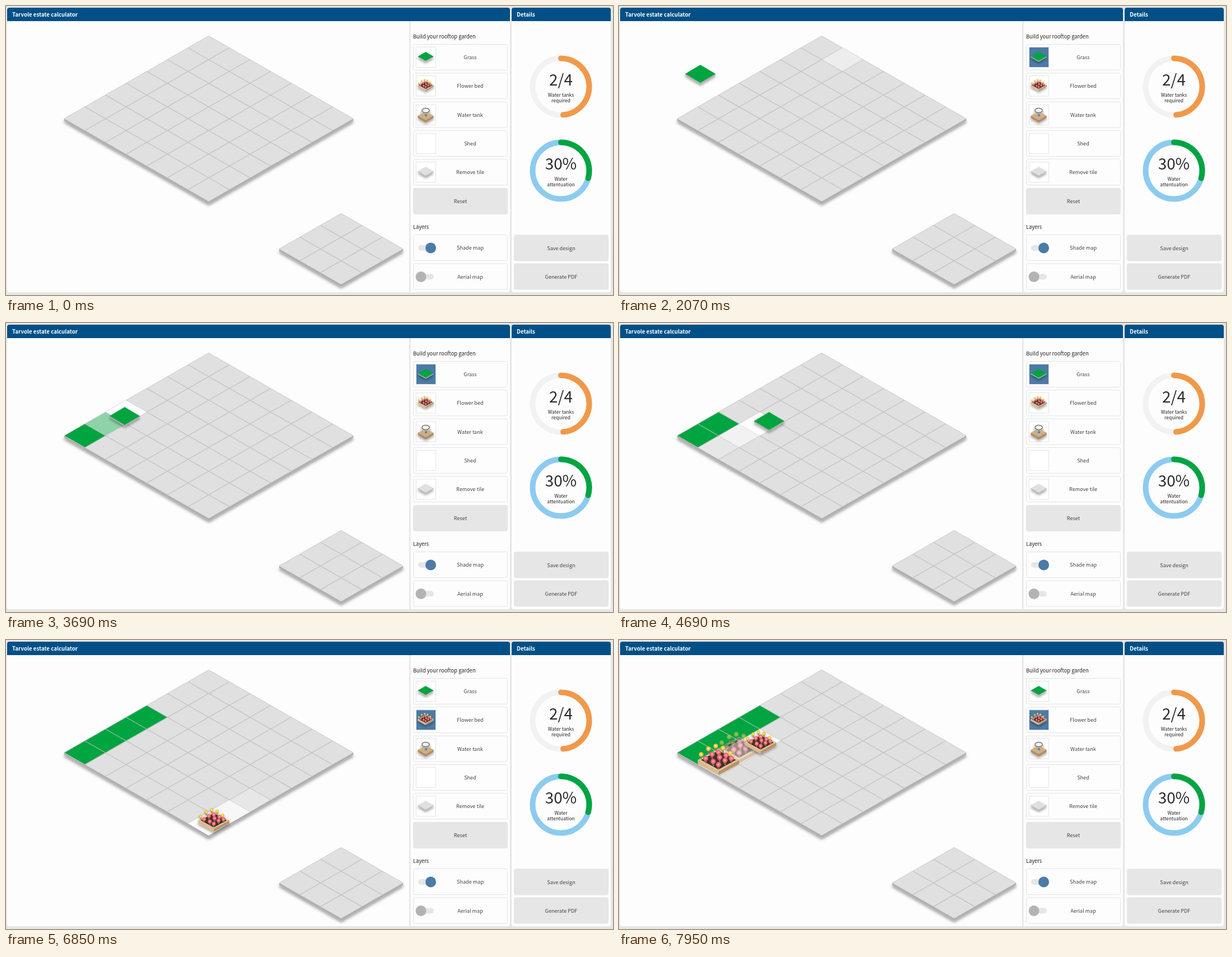
Animation, 1084 px wide and 516 px high, one loop 8 s. Source, as an HTML page:

```html
<!DOCTYPE html>
<html lang="en">
<head>
<meta charset="utf-8">
<style>
html, body { margin: 0; width: 100%; height: 100%; overflow: hidden; background: #e6e6e6; }
svg { display: block; width: 100vw; height: 100vh; }
text { font: 9.15px "Noto Sans CJK JP", "Noto Sans CJK SC", "Noto Sans CJK", "Open Sans", sans-serif; fill: #444; }
.head { font-size: 9.7px; font-weight: 700; fill: #fff; }
.title { font-size: 9.3px; font-weight: 500; fill: #222; }
.mid { text-anchor: middle; }
.big { font-size: 27.8px; fill: #2b2b2b; }
.small { font-size: 8.5px; font-weight: 500; fill: #222; }
</style>
</head>
<body>
<svg id="stage" viewBox="0 0 1084 516"></svg>
<script>
const LOOP = 8000, STEP = 77.1, PHASE = 60;
const HW = 36.86, HH = 21.1, TOP_X = 362, TOP_Y = 53.5, SIZE = 7;
const GREEN = '#00a441', BLUE = '#4b7ba6', GREY = '#e0e0e0';

const poly = (points, fill, extra = '') => `<polygon points="${points.join(' ')}" fill="${fill}" ${extra}/>`;
const rect = (x, y, w, h, fill, extra = '') => `<rect x="${x}" y="${y}" width="${w}" height="${h}" fill="${fill}" ${extra}/>`;
const circle = (x, y, r, fill, extra = '') => `<circle cx="${x}" cy="${y}" r="${r}" fill="${fill}" ${extra}/>`;
const label = (x, y, str, cls = 'mid') => `<text x="${x}" y="${y}" class="${cls}">${str}</text>`;
const place = (x, y, content, scale = 1) => `<g transform="translate(${x} ${y}) scale(${scale})">${content}</g>`;
const diamond = (x, y, w, h) => [[x - w, y], [x, y - h], [x + w, y], [x, y + h]];
const cellCentre = (i, j) => [TOP_X + (i - j) * HW, TOP_Y + (i + j + 1) * HH];

// Flat tile with a visible lower edge
function slab(x, y, w, h, depth, top, edge, extra = '') {
  return poly([[x - w, y], [x + w, y], [x + w, y + depth], [x, y + h + depth], [x - w, y + depth]], edge) +
    poly(diamond(x, y, w, h), top, extra);
}

function board(x, y, n) {
  let lines = '';
  for (let k = 1; k < n; k++) {
    const a = k * HW, b = k * HH, c = n * HW, d = n * HH;
    lines += `M${x + a} ${y + b}l${-c} ${d}M${x - a} ${y + b}l${c} ${d}`;
  }
  return `<g filter="url(#boardShadow)">${slab(x, y + n * HH, n * HW, n * HH, 3.5, GREY, '#adadad', 'stroke="#cacaca"')}</g>` +
    `<path d="${lines}" stroke="#c6c6c6" stroke-width="1.5" fill="none"/>`;
}

function flowerBed() {
  const yellows = [], pinks = [];
  for (let k = 0; k < 5; k++) yellows.push([-31 + k * 13, -18 - 15 * Math.sin(k * .75)]);
  for (let a = 0; a < 3; a++) for (let b = 0; b < 3; b++)
    pinks.push([(a - b) * 11.5 + a % 2 * 2, -22 + (a + b) * 5.5 - b % 2 * 2]);
  const stems = [...yellows, ...pinks].map(([x, y]) => `M${x} ${y}l1 9M${x - 4} ${y}l4 8l3 -9`).join('');
  const flower = (size, petal, heart) => ([x, y]) => circle(x, y, size, petal) + circle(x, y, size * .45, heart);
  const side = (dir, fill) => poly([[dir * 37, -8], [0, 12], [0, 19], [dir * 37, -1]], fill);
  return side(-1, '#dcb98d') + side(1, '#b99267') +
    poly(diamond(0, -8, 37, 20.5), '#e3c49b') + poly(diamond(0, -8, 31, 17), '#4b2f20') +
    `<path d="${stems}" stroke="#77866b" stroke-width="1.2" fill="none"/>` +
    yellows.map(flower(4, '#efc63e', '#fbe58a')).join('') + pinks.map(flower(4.6, '#f0637a', '#f9a3a0')).join('');
}

function iconBox(y, id, content) {
  return rect(732.5, y + 5.5, 35, 36, '#fff', `stroke="#e4e4e4" ${id ? `id="${id}"` : ''}`) +
    `<g filter="url(#tileShadow)">${content}</g>`;
}

function button(x, y, w, str, filled, textX = x + w / 2) {
  return rect(x + .5, y + .5, w - 1, 46, filled ? '#e6e6e6' : '#fdfdfd', 'rx="3" stroke="#e4e4e4"') + label(textX, y + 27, str);
}

function ring(y, back, front, degrees, value, lines) {
  const r = 50.5, a = degrees * Math.PI / 180, x = 991;
  return circle(x, y, r, 'none', `stroke="${back}" stroke-width="10"`) +
    `<path d="M${x} ${y - r}A${r} ${r} 0 0 1 ${x + r * Math.sin(a)} ${y - r * Math.cos(a)}" fill="none" stroke="${front}" stroke-width="10" stroke-linecap="round"/>` +
    label(x, y - 2, value, 'mid big') + lines.map((s, k) => label(x, y + 17.5 + k * 10, s, 'mid small')).join('');
}

function toggle(y, knobX, colour) {
  return rect(736, y - 5, 28, 10, '#e6e6e6', 'rx="5"') + circle(knobX, y, 9.5, colour);
}

function panel(x, w, str) {
  return rect(x, 3, w, 508, '#fdfdfd', 'rx="4"') +
    `<path d="M${x} 27V7q0 -4 4 -4h${w - 8}q4 0 4 4V27z" fill="#005087"/>` + label(x + 9, 19.3, str, 'head');
}

// Planted tiles: column, row, start of fade, kind
const plants = [
  [0, 6, 2750, 'grass'], [0, 5, 3500, 'grass'], [0, 4, 5160, 'grass'], [0, 3, 5470, 'grass'],
  [1, 5, 7690, 'bed'], [1, 6, 7230, 'bed']
];
const PLANT_FADE = 450, HOVER_STEPS = 5.2;

const waterTank = slab(749.5, 196, 14, 8, 4, '#cfae85', '#b08c63') +
  '<path d="M742 187L740 195M757 187L759 195" stroke="#ccc"/>' +
  '<ellipse cx="749.5" cy="186.5" rx="6.5" ry="4" fill="#f4f4f4" stroke="#777" stroke-width="1.5"/>' +
  circle(750, 195, 2, '#2f86d6');

let cells = '';
for (let i = 0; i < SIZE; i++) for (let j = 0; j < SIZE; j++)
  cells += poly(diamond(...cellCentre(i, j), HW, HH), '#fdfdfd', 'class="cell" opacity="0"');

const planted = plants.map(([i, j, , kind]) => `<g class="plant" opacity="0">` + place(...cellCentre(i, j),
  kind === 'bed' ? flowerBed() : poly(diamond(0, 0, HW, HH), GREEN, 'stroke="#c6c6c6" stroke-width=".8"')) + '</g>').join('');

const stage = document.getElementById('stage');
stage.innerHTML = `<defs>
  <filter id="boardShadow" x="-10%" y="-10%" width="120%" height="125%"><feDropShadow dx="0" dy="4" stdDeviation="2.8" flood-opacity=".35"/></filter>
  <filter id="tileShadow" x="-30%" y="-30%" width="160%" height="180%"><feDropShadow dx="0" dy="3" stdDeviation="2" flood-opacity=".35"/></filter>
  </defs>` +
  rect(0, 0, 1084, 516, '#e6e6e6') +
  panel(2, 898, 'Tarvole estate calculator') + panel(903, 177, 'Details') +
  rect(720, 27, 2.5, 484, '#e6e6e6') +
  board(TOP_X, TOP_Y, SIZE) + board(598.5, 370.5, 3) + cells + planted +
  label(727, 58, 'Build your rooftop garden', 'title') +
  ['Grass', 'Flower bed', 'Water tank', 'Shed', 'Remove tile'].map((s, k) => button(727, 68 + k * 51.3, 169, s, false, 829)).join('') +
  iconBox(68, 'grassBox', slab(749.5, 90, 14, 8, 1.5, GREEN, '#b5b5b5')) +
  iconBox(119.3, 'bedBox', place(749.5, 144.5, flowerBed(), .39)) +
  iconBox(170.6, '', waterTank) + iconBox(221.9, '', '') +
  iconBox(273.2, '', slab(749.5, 295, 14, 8, 1.5, GREY, '#b5b5b5')) +
  button(727, 325, 169, 'Reset', true) +
  label(727, 398, 'Layers', 'title') +
  button(727, 408, 169, 'Shade map', false, 829) + toggle(432, 758.5, BLUE) +
  button(727, 459.5, 169, 'Aerial map', false, 829) + toggle(483.5, 741, '#b3b3b3') +
  ring(144, '#f2f2f2', '#f0994a', 175.5, '2/4', ['Water tanks', 'required']) +
  ring(294, '#8ccbf0', GREEN, 105.5, '30%', ['Water', 'attentuation']) +
  button(907, 408.5, 169, 'Save design', true) + button(907, 459.5, 169, 'Generate PDF', true) +
  `<g id="carrier" filter="url(#tileShadow)">
    <g id="carriedGrass">${slab(0, 0, 27, 16, 2.5, GREEN, '#a9b0a9')}</g>
    <g id="carriedBed">${place(0, 6, flowerBed(), .75)}</g></g>
  <path id="pointer" d="M.5 .5V13L3.4 10.3L5.6 15.6L7.6 14.7L5.4 9.6H9.3Z" fill="#fff" stroke="#000" stroke-width=".9"/>`;

// Time, x, y
const carrierPath = [
  [1520, 735, 88], [1833, 398, 95], [1910, 262, 100], [2065, 145, 121], [2142, 118, 140], [2373, 125, 176],
  [2527, 139, 196], [2900, 150, 193], [3100, 178, 182], [3460, 178, 182], [3684, 212, 166], [3850, 213, 162],
  [4250, 180, 215], [4400, 185, 216], [4686, 268, 175], [4765, 286, 167], [5070, 214, 162], [5240, 214, 162],
  [5470, 252, 138], [5611, 262, 132], [5688, 480, 95], [6010, 722, 132], [6150, 738, 140], [6380, 738, 140],
  [6459, 640, 200], [6536, 434, 282], [6613, 398, 300], [6845, 371, 322], [7153, 200, 232], [7230, 180, 220],
  [7540, 180, 220], [7690, 214, 202], [7924, 253, 183]
];
const pointerPath = [[520, 942, 500], [750, 900, 340], [980, 800, 150], [1190, 751, 83]];

function along(path, t) {
  const k = path.findIndex(p => p[0] > t);
  if (k === 0) return null;
  if (k < 0) return path[path.length - 1].slice(1);
  const [t0, x0, y0] = path[k - 1], [t1, x1, y1] = path[k], f = (t - t0) / (t1 - t0);
  return [x0 + (x1 - x0) * f, y0 + (y1 - y0) * f];
}

function hoveredCell(t) {
  const pos = along(carrierPath, t);
  if (!pos) return -1;
  const u = (pos[0] - TOP_X) / HW, v = (pos[1] - TOP_Y) / HH;
  const i = Math.floor((u + v) / 2), j = Math.floor((v - u) / 2);
  return i >= 0 && j >= 0 && i < SIZE && j < SIZE ? i * SIZE + j : -1;
}

const byId = id => document.getElementById(id);
const show = (el, on) => el.setAttribute('visibility', on ? 'visible' : 'hidden');
const cellEls = [...document.querySelectorAll('.cell')];
const plantEls = [...document.querySelectorAll('.plant')];
const carrier = byId('carrier'), pointer = byId('pointer');
const carriedGrass = byId('carriedGrass'), carriedBed = byId('carriedBed');
const grassBox = byId('grassBox'), bedBox = byId('bedBox');

function moveTo(el, pos) {
  el.setAttribute('display', pos ? 'inline' : 'none');
  if (pos) el.setAttribute('transform', `translate(${pos[0]} ${pos[1]})`);
}

function draw(time) {
  const t = PHASE + STEP * Math.floor((time - PHASE) / STEP);
  const bedChosen = t >= 6160;
  grassBox.setAttribute('fill', t >= 1200 && !bedChosen ? BLUE : '#fff');
  bedBox.setAttribute('fill', bedChosen ? BLUE : '#fff');
  moveTo(carrier, along(carrierPath, t));
  show(carriedGrass, !bedChosen);
  show(carriedBed, bedChosen);
  moveTo(pointer, time >= 520 && time < 1380 ? along(pointerPath, Math.max(t, 520)) : null);

  const glow = new Array(SIZE * SIZE).fill(0);
  for (let k = 5; k >= 0; k--) {
    const cell = hoveredCell(t - k * STEP);
    if (cell >= 0) glow[cell] = 1 - k / HOVER_STEPS;
  }
  cellEls.forEach((el, k) => el.setAttribute('opacity', glow[k]));
  plants.forEach(([, , start], k) =>
    plantEls[k].setAttribute('opacity', Math.max(0, Math.min(1, (t - start) / PLANT_FADE))));
}

function frame() {
  draw(performance.now() % LOOP);
  requestAnimationFrame(frame);
}
frame();
</script>
</body>
</html>
```
